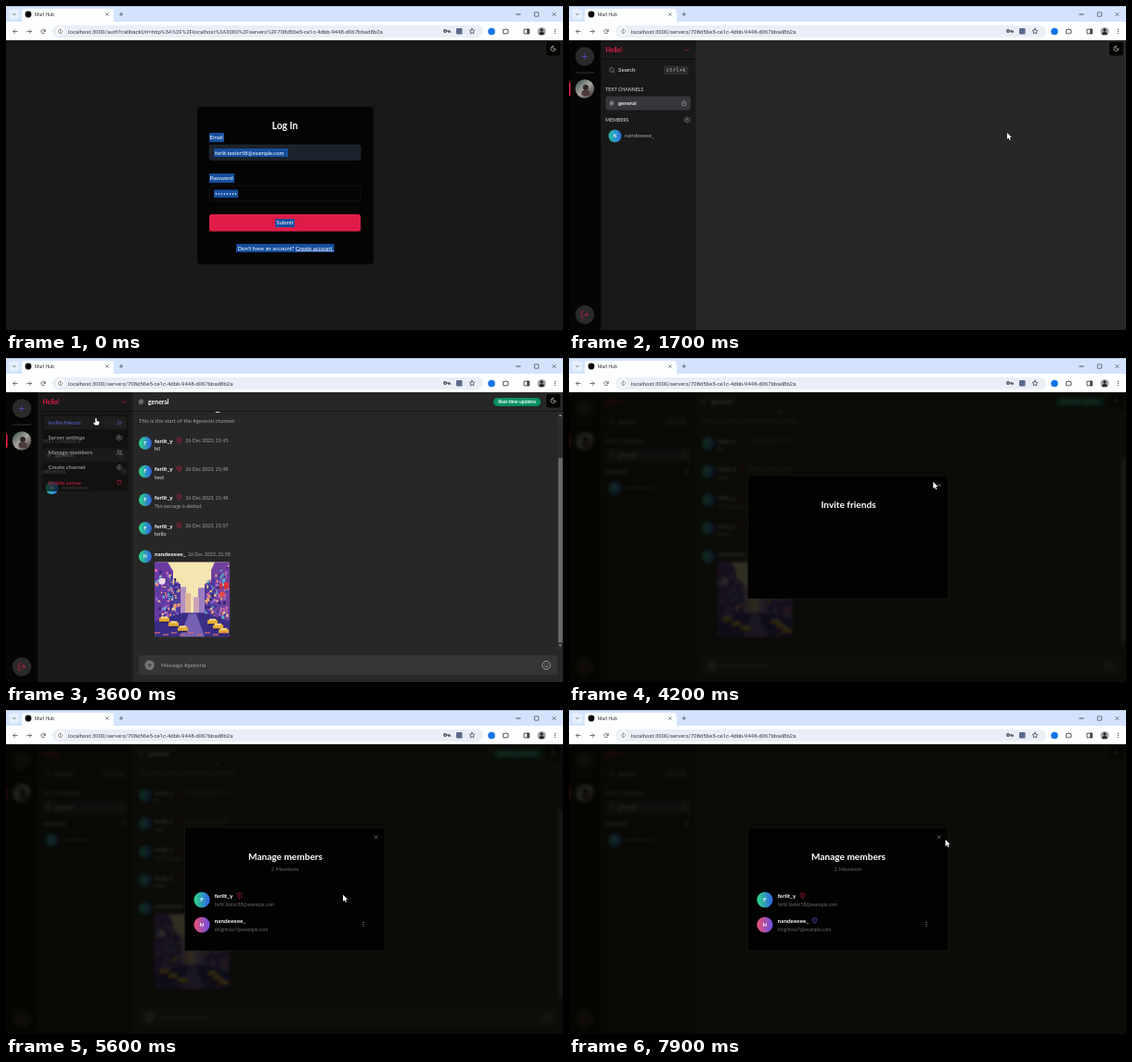
Write an HTML page with a canvas that moves like this. It is 600x350 px and loops after 8000 ms.

```html
<!DOCTYPE html>
<html lang="en">
<head>
<meta charset="utf-8">
<title>Murl Hub</title>
<style>
html, body { margin: 0; width: 100%; height: 100%; overflow: hidden; background: #050502; }
canvas { display: block; width: 600px; height: 350px; }
</style>
</head>
<body>
<canvas id="stage" width="600" height="350"></canvas>
<script>
const LOOP = 8000;
const TOP = 37; // height of the browser bar
const stage = document.getElementById('stage').getContext('2d');
const page = document.createElement('canvas');
page.width = 600;
page.height = 350;
const pageCtx = page.getContext('2d');
let ctx = stage;

const APP = 'Lato, sans-serif', UI = 'Roboto, sans-serif', MONO = '"DejaVu Sans Mono", monospace';
const ROSE = '#e11d48', INDIGO = '#6366f1', GREY = '#a1a1a1', MAIN = '#272727';
const OWNER = { name: 'ferlit_y', mail: 'ferlit.tester58@example.com', letter: 'F' };
const GUEST = { name: 'nandeeeee_', mail: 'nnightow7@example.com', letter: 'N' };
const SERVER_PATH = 'servers/708d56e5-ce1c-4dbb-9448-d067bbad8b2a';
const AUTH_URL = 'localhost:3000/auth?callbackUrl=' + encodeURIComponent('http://localhost:3000/' + SERVER_PATH);

const MESSAGES = [
  { by: OWNER, time: '21:45', text: 'hi!' },
  { by: OWNER, time: '21:48', text: 'test' },
  { by: OWNER, time: '21:48', text: 'This message is deleted.', deleted: true },
  { by: OWNER, time: '21:57', text: 'hello' },
  { by: GUEST, time: '21:58', image: true }
];
const MENU = [
  ['Invite friends', 'addUser', INDIGO], ['Server settings', 'gear', '#c9c9c7'],
  ['Manage members', 'users', '#c9c9c7'], ['Create channel', 'addRing', '#c9c9c7'],
  ['Delete server', 'trash', ROSE]
];

const ICONS = {
  search: 'M11 3a8 8 0 1 0 .01 0M21 21l-4.3-4.3',
  down: 'M6 9l6 6 6-6',
  plus: 'M12 5v14M5 12h14',
  x: 'M18 6L6 18M6 6l12 12',
  hash: 'M4 9h16M4 15h16M10 3L8 21M16 3l-2 18',
  lock: 'M5 11h14v10H5zM7 11V7a5 5 0 0 1 10 0v4',
  gear: 'M12 9a3 3 0 1 0 .01 0M10 2h4l1 3 3 2 3-1 2 4-2 2 2 3-2 4-3-1-3 2-1 2h-4l-1-2-3-2-3 1-2-4 2-3-2-2 2-4 3 1 3-2z',
  shield: 'M12 22s8-4 8-10V5l-8-3-8 3v7c0 6 8 10 8 10zM12 8v4M12 16h.01',
  leave: 'M9 21H5a2 2 0 0 1-2-2V5a2 2 0 0 1 2-2h4M16 17l5-5-5-5M21 12H9',
  smile: 'M12 2a10 10 0 1 0 .01 0M8 14s1.5 2 4 2 4-2 4-2M9 9h.01M15 9h.01',
  edit: 'M11 4H4v16h16v-7M18 2l4 4-10 10H8v-4z',
  trash: 'M3 6h18M6 6v15h12V6M9 6V3h6v3',
  users: 'M9 3a4 4 0 1 0 .01 0M2 21v-2a4 4 0 0 1 4-4h6a4 4 0 0 1 4 4v2M17 3a4 4 0 0 1 0 8M22 21v-2a4 4 0 0 0-3-4',
  addUser: 'M9 3a4 4 0 1 0 .01 0M2 21v-2a4 4 0 0 1 4-4h6a4 4 0 0 1 4 4v2M19 8v6M22 11h-6',
  addRing: 'M12 2a10 10 0 1 0 .01 0M12 8v8M8 12h8',
  moon: 'M12 3a6 6 0 0 0 9 9 9 9 0 1 1-9-9z',
  back: 'M20 12H4M11 19l-7-7 7-7',
  next: 'M4 12h16M13 5l7 7-7 7',
  reload: 'M20 11a8 8 0 1 0-2.3 6.7M20 4v7h-7',
  star: 'M12 2l3 6.5 7 .8-5.2 4.8 1.5 7L12 17.6 5.7 21l1.5-7L2 9.3l7-.8z',
  key: 'M6 8a4 4 0 1 0 .01 0M10 12h12v4M17 12v4',
  puzzle: 'M4 7h5a2.5 2.5 0 1 1 5 0h5v5a2.5 2.5 0 1 1 0 5v4H4z',
  panel: 'M3 4h18v16H3zM14 4v16M17 4v16M20 4v16',
  info: 'M12 2a10 10 0 1 0 .01 0M12 11v6M12 7h.01'
};
const ARROW = new Path2D('M0 0V7.2L1.7 5.7L2.8 8.2L4 7.7L2.9 5.2H5.1Z');
const HAND = new Path2D('M-.8 .2Q0-.6 .7 .2V3L3 3.6Q3.6 3.9 3.5 4.8L2.8 7.6H-1.4L-3 5Q-2.6 4-.8 5Z');

const clamp = v => Math.min(1, Math.max(0, v));
const fade = (t, from, to, len = 150) => clamp((t - from) / len) * (1 - clamp((t - to) / len));

// Eased interpolation through [time, ...values] stops.
function along(t, stops) {
  if (t <= stops[0][0]) return stops[0].slice(1);
  for (let i = 1; i < stops.length; i++) {
    const a = stops[i - 1], b = stops[i];
    if (t > b[0]) continue;
    const k = (t - a[0]) / (b[0] - a[0]), e = k * k * (3 - 2 * k);
    return a.slice(1).map((v, j) => v + (b[j + 1] - v) * e);
  }
  return stops[stops.length - 1].slice(1);
}

const pointerAt = t => along(t, [
  [900, 520, 118], [1300, 488, 135], [1800, 470, 137], [2200, 276.5, 139.5], [2900, 276.5, 139.5],
  [3250, 90, 44], [3400, 90, 44], [3550, 97, 65], [3650, 97, 65], [4250, 398, 135], [4450, 398, 135],
  [4780, 91, 43], [4950, 91, 43], [5180, 84, 99], [5300, 84, 99], [5600, 363, 199.5], [6100, 385, 229],
  [6900, 385, 229], [7650, 400, 146], [7900, 405.5, 140]
]);
const scrollAt = t => along(t, [[2050, 44.5], [2300, 0], [2800, 0], [3100, 44.5]])[0];

function rect(x, y, w, h, fill, r = 0, line) {
  ctx.beginPath();
  ctx.roundRect(x, y, w, h, r);
  if (fill) { ctx.fillStyle = fill; ctx.fill(); }
  if (line) { ctx.strokeStyle = line; ctx.lineWidth = 0.6; ctx.stroke(); }
}
function disc(x, y, r, fill) {
  ctx.beginPath();
  ctx.arc(x, y, r, 0, 7);
  ctx.fillStyle = fill;
  ctx.fill();
}
function poly(fill, ...p) {
  ctx.beginPath();
  for (let i = 0; i < p.length; i += 2) ctx.lineTo(p[i], p[i + 1]);
  ctx.fillStyle = fill;
  ctx.fill();
}
// y is the middle of the capitals.
function text(s, x, y, size, color, style = '', align = 'left', font = APP) {
  ctx.font = `${style} ${size}px ${font}`;
  ctx.textAlign = align;
  ctx.fillStyle = color;
  ctx.fillText(s, x, y + size * 0.35);
}
function icon(name, x, y, color, size = 7, weight = 2) {
  ctx.save();
  ctx.translate(x - size / 2, y - size / 2);
  ctx.scale(size / 24, size / 24);
  ctx.strokeStyle = color;
  ctx.lineWidth = weight;
  ctx.lineCap = ctx.lineJoin = 'round';
  ctx.stroke(new Path2D(ICONS[name]));
  ctx.restore();
}
function avatar(x, y, r, letter, from = '#2fd08c', to = '#2f6be0') {
  const g = ctx.createLinearGradient(x - r, y, x + r, y);
  g.addColorStop(0.1, from);
  g.addColorStop(0.9, to);
  disc(x, y, r, g);
  text(letter, x, y, r * 0.72, '#f2f8ff', 'bold', 'center');
}
function dots(x, y, color) {
  for (let i = -1; i < 2; i++) disc(x, y + i * 2.1, 0.6, color);
}
function moonButton() {
  rect(582, 39, 15, 14.5, '#050502', 2);
  icon('moon', 589.5, 46, '#eee', 7);
}

function drawBrowser(url) {
  rect(0, 0, 600, 18, '#d3e3fd');
  rect(0, 0, 600, 1, '#b4c2da');
  rect(0, 17, 600, TOP - 17, '#fdfeff');
  rect(3.5, 3.5, 11, 11, '#e6effd', 3);
  icon('down', 9, 9, '#222', 5, 3);
  rect(17, 3, 99, 15, '#fdfeff', [4, 4, 0, 0]);
  disc(24, 9, 3.4, '#000');
  text('Murl Hub', 31, 9.2, 5.1, '#333', '', 'left', UI);
  icon('x', 109, 9, '#333', 5.4, 2.4);
  icon('plus', 124, 9, '#333', 6, 2.4);
  rect(549.5, 8.6, 5, 0.8, '#222');
  rect(569.3, 6.8, 4.4, 4.4, null, 0.5, '#222');
  icon('x', 590.5, 9, '#222', 6.6, 2);
  icon('back', 10, 27.5, '#444', 6.6, 2.6);
  icon('next', 25, 27.5, '#444', 6.6, 2.6);
  icon('reload', 40, 27.5, '#444', 6.6, 2.6);
  rect(50, 21, 464, 13, '#e9eef7', 6.5);
  disc(58.5, 27.5, 4.7, '#fff');
  icon('info', 58.5, 27.5, '#444', 5.8, 2.3);
  text(url, 67, 27.6, 6, '#3c4043', '', 'left', UI);
  icon('key', 475, 27, '#3c4043', 8, 3.4);
  rect(485, 24, 6.5, 6.5, '#5a6a8c', 1);
  icon('star', 502, 27.2, '#3c4043', 7, 2.4);
  disc(523, 27.5, 3.8, '#1473e6');
  icon('puzzle', 538.5, 27, '#333', 7.4, 2.6);
  icon('panel', 561, 27.5, '#333', 7, 2.8);
  disc(577, 27.5, 4.6, '#a3a6ab');
  disc(577, 26, 1.7, '#26282b');
  rect(574.3, 28, 5.4, 3, '#26282b', [2.5, 2.5, 1, 1]);
  dots(591.5, 27.5, '#333');
}

function drawLogin() {
  const mark = '#164f9f', white = '#fff';
  rect(0, TOP, 600, 313, '#1a1919');
  rect(206, 109, 190, 170, '#040402', 4, '#11100f');
  text('Log In', 300.5, 129.5, 10.4, white, 'bold', 'center');
  rect(219, 137, 16, 10, mark);
  text('Email', 219.5, 141.7, 6, white);
  rect(219, 150, 163, 16.5, '#1b232c', 2.5, '#29323c');
  rect(224, 154, 80, 9, mark);
  text(OWNER.mail, 225, 158.5, 5.9, white);
  rect(219, 181, 27, 10, mark);
  text('Password', 219.5, 185.8, 6, white);
  rect(219, 194, 163, 17, '#040402', 2.5, '#242120');
  rect(224, 198.5, 26, 8.5, mark);
  for (let i = 0; i < 8; i++) disc(226.3 + i * 3, 203, 0.8, white);
  rect(219, 225, 163, 18.5, '#df1c48', 2.5);
  rect(290, 230, 21, 9, mark);
  text('Submit', 300.5, 234.3, 6, white, '', 'center');
  rect(248, 257, 105.5, 9, mark);
  text("Don't have an account? Create account", 300.5, 261.5, 5.95, white, '', 'center');
  rect(312, 264.3, 41, 0.5, white);
  moonButton();
}

function drawLoader(t) {
  rect(0, TOP, 600, 313, '#050502');
  for (let i = 0; i < 3; i++)
    disc(296.5 + i * 4.2, 190.4 + 1.2 * Math.sin((t - 1300) / 110 + 1.6 - i * 2.6), 1.3, '#5f50c8');
  icon('moon', 589.5, 46, '#4a4a48', 7);
}

function drawCity(x, y) {
  ctx.save();
  ctx.beginPath();
  ctx.roundRect(x, y, 81, 81, 3);
  ctx.clip();
  ctx.translate(x, y);
  rect(0, 0, 81, 81, '#f4e6b0');
  rect(26, 27, 8, 32, '#b58fc0');
  rect(33, 34, 6, 25, '#e0b79a');
  rect(47, 28, 10, 31, '#9a7cc0');
  rect(42, 38, 6, 21, '#c9a2b8');
  poly('#6a3aa3', 0, 0, 14, 0, 20, 10, 20, 60, 0, 66);
  poly('#4d379a', 16, 18, 28, 24, 28, 58, 16, 62);
  poly('#72409f', 81, 0, 65, 0, 61, 9, 61, 60, 81, 66);
  poly('#4d379a', 65, 17, 54, 24, 54, 58, 65, 62);
  const tones = ['#d86aa8', '#38459f', '#eda470', '#9a6bd0', '#2f2470', '#58b4d0', '#f0d08a'];
  let seed = 11;
  const rnd = () => (seed = seed * 16807 % 2147483647) / 2147483647;
  for (let i = 0; i < 240; i++) {
    const off = rnd() * 25, wx = i % 2 ? off : 79 - off;
    rect(wx, 2 + off * 0.7 + rnd() * (58 - off * 0.7), 1 + rnd() * 2, 1 + rnd() * 3, tones[i % 7]);
  }
  poly('#3a2d86', 0, 64, 30, 55, 52, 55, 81, 64, 81, 81, 0, 81);
  poly('#7560b4', 37, 56, 45, 56, 54, 81, 27, 81);
  for (let i = 0; i < 6; i++) {
    const left = i % 2 ? 54 + i * 3 : 5 + i * 5;
    rect(left, 60 + i * 2.5, 11, 5, '#e4a934', 1.5);
    rect(left + 2, 59 + i * 2.5, 7, 2, '#f7d98a');
    rect(left + 1, 64.5 + i * 2.5, 9, 1.5, '#261b58');
  }
  for (let i = 0; i < 9; i++) rect(i * 9, 76 + i % 2 * 2, 6, 1.2, '#cf6d70');
  disc(8, 21, 3.5, '#ead8ef');
  rect(70, 23, 3, 6, '#d8323c');
  rect(75, 22, 5, 7, '#d8323c');
  disc(73, 35, 3, '#e14a4f');
  ctx.restore();
}

function drawRail() {
  rect(0, TOP, 34.5, 313, '#050503');
  disc(17, 54.5, 10.2, '#2b2a2a');
  icon('plus', 17, 54.5, '#5a51d6', 10, 1.7);
  rect(7, 71.5, 20, 1, '#343331');
  rect(-2, 82, 3.6, 15, ROSE, 1.5);
  const g = ctx.createLinearGradient(8, 80, 26, 99);
  g.addColorStop(0, '#37504a');
  g.addColorStop(0.5, '#a9a6a0');
  g.addColorStop(1, '#33272a');
  disc(17, 89.5, 10.2, g);
  disc(18, 88, 3, '#2c2626');
  rect(13.5, 91, 9, 6, '#4d373a', 3);
  disc(17, 333.5, 10.2, '#2b2a2a');
  icon('leave', 17, 333.5, '#c41f45', 9.5, 2);
}

function drawSidebar(promoted, headerLit) {
  rect(34.5, TOP, 102, 313, '#191919');
  if (headerLit) rect(34.5, TOP, 102, 20, '#222222');
  rect(34.5, 57, 102, 0.8, '#0b0b0a');
  text('Hello!', 39.5, 47.3, 6.9, ROSE, 'bold');
  icon('down', 127, 47.5, ROSE, 7.5, 2.2);
  icon('search', 46.3, 69.3, GREY, 7);
  text('Search', 53, 69.3, 6.2, '#c2c2c0', 'bold');
  rect(102.5, 65, 25.5, 8.7, '#2b2a2a', 1.5, '#393837');
  text('ctrl+k', 115.3, 69.3, 5.8, '#b9b9b9', '', 'center', MONO);
  text('TEXT CHANNELS', 39.3, 90.5, 5.1, '#b0b0ae', 'bold');
  rect(39.5, 97.5, 91.5, 15, '#37373b', 3);
  icon('hash', 46, 105, GREY, 6.5, 2.4);
  text('general', 53, 105, 6, '#eee', 'bold');
  icon('lock', 124, 105, GREY, 6.6);
  text('MEMBERS', 39.3, 123.2, 5.1, '#b0b0ae', 'bold');
  icon('gear', 127.3, 123, GREY, 6.5);
  avatar(49.5, 140.3, 6.9, GUEST.letter, '#2cb9a8', '#2c78e0');
  text(GUEST.name, 60, 140.3, 6, '#aaa');
  if (promoted) icon('shield', 101, 140, INDIGO, 6.5);
}

function drawMessage(m, y, hovered) {
  avatar(150, y + 2.5, 6.9, m.by.letter);
  text(m.by.name, 160, y, 6.3, '#fff', 'bold');
  const own = m.by === OWNER;
  if (own) icon('shield', 186.5, y - 0.3, ROSE, 6.8);
  text('26 Dec 2023, ' + m.time, own ? 193.5 : 196, y, 5.2, GREY);
  if (m.image) drawCity(160, y + 8.3);
  else if (m.deleted) text(m.text, 160, y + 9.2, 5.2, GREY, 'italic');
  else text(m.text, 160, y + 8.8, 6, '#e3e3e3');
  if (hovered && own && !m.deleted) {
    rect(564.5, y - 14, 21, 11, '#222', 2, '#3b3b3b');
    icon('edit', 570, y - 8.5, GREY, 6.4);
    icon('trash', 580, y - 8.5, GREY, 6.4);
  }
}

function drawChat(scroll, [px, py], blocked) {
  ctx.save();
  ctx.beginPath();
  ctx.rect(136, 58, 464, 257);
  ctx.clip();
  ctx.translate(0, -scroll);
  disc(159, 69.5, 16, '#40403f');
  icon('hash', 159, 69.5, '#fff', 19, 2);
  text('Welcome to #general', 143, 97, 13.2, '#fff', 'bold');
  text('This is the start of the #general channel.', 143, 112.3, 5.95, GREY);
  MESSAGES.forEach((m, i) => {
    const y = 134 + i * 30.6, top = y - 11 - scroll;
    drawMessage(m, y, !blocked && px > 140 && py > top && py < top + 30.6);
  });
  ctx.restore();

  rect(594, 58, 6, 257, '#2c2c2c');
  rect(595, 73 + scroll * 0.79, 4.5, 199, '#6a6a6a');
  poly('#8d8d8d', 595.3, 63, 598.7, 63, 597, 60.6);
  poly('#8d8d8d', 595.3, 309.5, 598.7, 309.5, 597, 312);
  rect(136.5, 57, 463.5, 0.8, '#0e0e0e');
  icon('hash', 145.5, 47.3, GREY, 7.5);
  text('general', 153, 47.3, 6.9, '#fff', 'bold');
  rect(525, 43, 51, 9, '#078f63', 4.5);
  text('Real-time updates', 550.5, 47.4, 5.05, '#fff', 'bold', 'center');
  rect(143, 321, 451, 21.5, '#353535', 3);
  disc(154.7, 331.8, 5.2, '#747474');
  icon('plus', 154.7, 331.8, '#2b2b2b', 6.5, 2.6);
  text('Message #general', 167, 331.8, 6.1, GREY);
  icon('smile', 582, 331.8, '#b5b5b5', 10.5, 1.9);
}

function drawMenu(alpha, pointer) {
  if (!alpha) return;
  ctx.save();
  ctx.globalAlpha = alpha;
  rect(39, 61, 92.5, 83, '#0d0d0c', 2);
  MENU.forEach(([label, glyph, color], i) => {
    const y = 70 + i * 16.1;
    if (Math.abs(pointer[1] + 4 - y) < 8) rect(40.5, y - 7.3, 89.5, 14.6, '#222222', 2);
    text(label, 45.5, y, 6, color, 'bold');
    icon(glyph, 122, y, color, 6.5);
  });
  ctx.restore();
}

function drawMember(who, y, colors, shield) {
  avatar(211, y, 8.6, who.letter, ...colors);
  text(who.name, 224.7, y - 4, 6.3, '#fff', 'bold');
  if (shield) icon('shield', who === OWNER ? 251.5 : 264.5, y - 4.5, shield, 7);
  text(who.mail, 224.7, y + 5.2, 5.1, '#6d6b68');
}

// Blurs and darkens the page below the browser bar, then zooms a panel in.
function drawDialog(alpha, title, content) {
  if (!alpha) return;
  ctx.save();
  ctx.beginPath();
  ctx.rect(0, TOP, 600, 313);
  ctx.clip();
  ctx.globalAlpha = alpha;
  ctx.filter = 'blur(1.7px)';
  ctx.drawImage(page, 0, 0);
  ctx.filter = 'none';
  rect(0, TOP, 600, 313, 'rgba(5,5,2,.82)');
  const zoom = 0.95 + 0.05 * alpha;
  ctx.translate(300.5, 194);
  ctx.scale(zoom, zoom);
  ctx.translate(-300.5, -194);
  rect(192.5, 127, 216, 133, '#020201', 1, '#1f1d1a');
  icon('x', 398.6, 137.4, '#b3b3b1', 6.5, 2);
  text(title, 301, 158.5, 10.1, '#fff', 'bold', 'center');
  if (content) content();
  ctx.restore();
}

function drawPointer(x, y, hand) {
  ctx.save();
  ctx.translate(x, y);
  ctx.lineWidth = 0.9;
  ctx.lineJoin = 'round';
  ctx.strokeStyle = '#000';
  ctx.fillStyle = '#fff';
  const shape = hand ? HAND : ARROW;
  ctx.stroke(shape);
  ctx.fill(shape);
  ctx.restore();
}

function drawPage(t, pointer, promoted, blocked) {
  if (t < 900) return drawLogin();
  if (t < 1600) return drawLoader(t);
  const menu = Math.max(fade(t, 3300, 3555), fade(t, 4870, 5230));
  const headerLit = !blocked && !menu && pointer[0] < 136 && pointer[1] < 56;
  rect(0, TOP, 600, 313, MAIN);
  drawRail();
  drawSidebar(promoted, headerLit);
  if (t >= 1900 && t < 7700) drawChat(scrollAt(t), pointer, blocked || menu);
  moonButton();
  drawMenu(menu, pointer);
}

function render(t) {
  const pointer = pointerAt(t), promoted = t >= 7000;
  const invite = fade(t, 3650, 4400), members = fade(t, 5280, LOOP);
  ctx = pageCtx;
  ctx.clearRect(0, 0, 600, 350);
  drawPage(t, pointer, promoted, invite || members);
  ctx = stage;
  ctx.drawImage(page, 0, 0);
  drawDialog(invite, 'Invite friends');
  drawDialog(members, 'Manage members', () => {
    text('2 Members', 300.5, 172.3, 6, '#686663', '', 'center');
    drawMember(OWNER, 205, ['#2fd08c', '#2f6be0'], ROSE);
    drawMember(GUEST, 232, ['#e0527c', '#7550d8'], promoted && INDIGO);
    dots(385, 231.5, '#a9a9a7');
  });
  drawBrowser(t < 900 ? AUTH_URL : 'localhost:3000/' + SERVER_PATH);
  const hand = (t > 3200 && t < 3680) || (t > 4700 && t < 5320);
  if (t >= 900) drawPointer(...pointer, hand);
}

function tick() {
  render(performance.now() % LOOP);
  requestAnimationFrame(tick);
}
tick();
</script>
</body>
</html>
```
